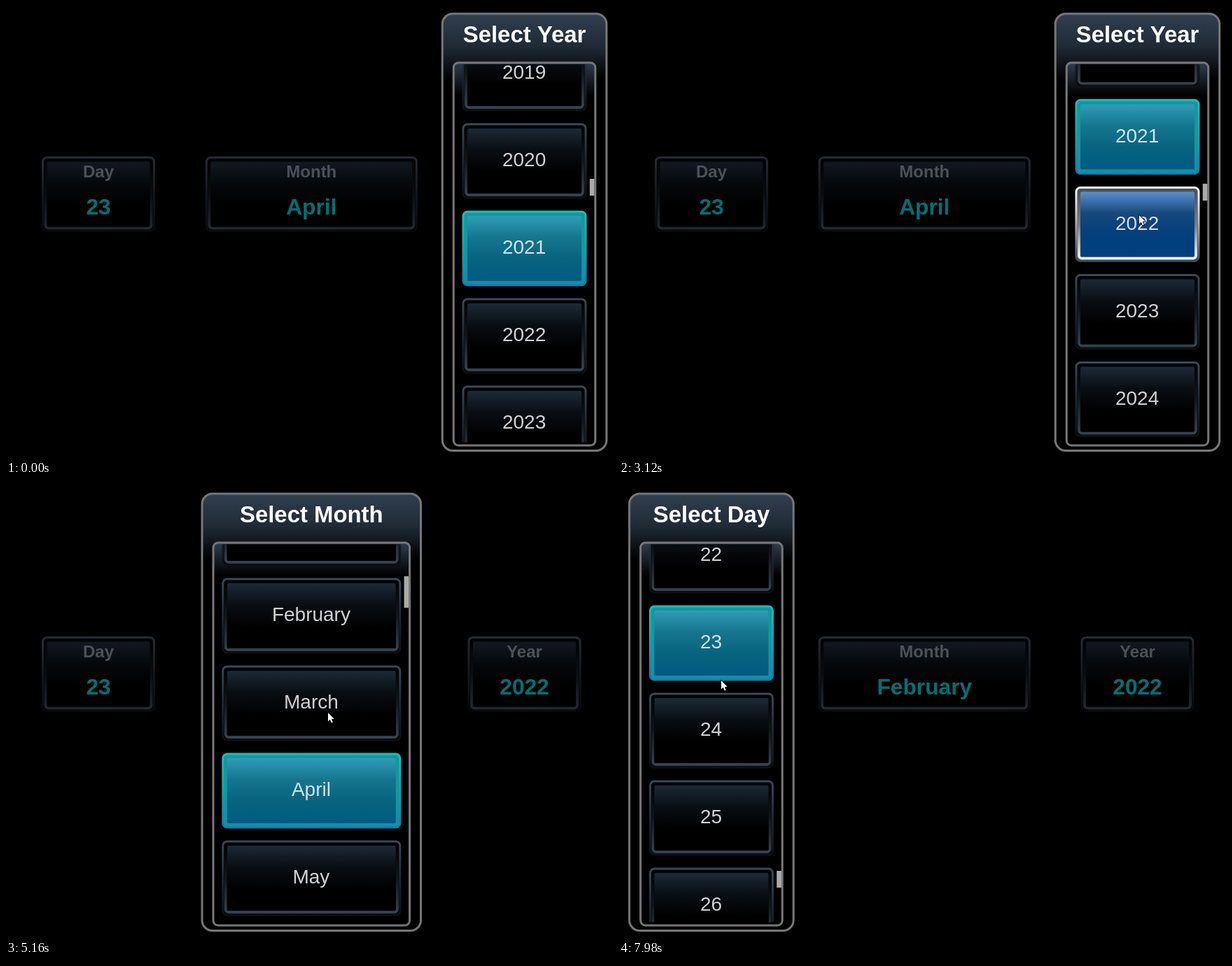
These frames come from a looping animation (867x646 px, 8 s). An HTML page with a canvas:

```html
<!DOCTYPE html>
<html lang="en">
<head>
<meta charset="utf-8">
<title>Date picker</title>
<style>
html, body { margin: 0; width: 100%; height: 100%; overflow: hidden; background: #000; }
canvas { display: block; width: 867px; height: 646px; }
</style>
</head>
<body>
<canvas id="stage" width="867" height="646"></canvas>
<script>
const ctx = document.getElementById('stage').getContext('2d');
const LOOP = 8000, STEP = 60, PITCH = 125, KEY_HEIGHT = 108;
const MONTHS = ['January', 'February', 'March', 'April', 'May', 'June', 'July'];
const ARROW = new Path2D('M0 0V12.5L2.8 9.8L4.8 14.4L6.8 13.5L4.8 9H8.8Z');

// Colours run from top to bottom.
const STYLES = {
  normal: {
    outer: ['#3b4a5b', '#1e2730', '#0c1014'],
    bezel: ['#000', '#11171d', '#3a4653'],
    face: ['#1c2a38', '#090e13', '#000', '#000']
  },
  selected: {
    outer: ['#22bbb9', '#16a3a8', '#167ba6'],
    bezel: ['#0e9a9c', '#109aa2', '#178ab0'],
    face: ['#319db7', '#15758f', '#07637f', '#005b80']
  },
  active: {
    outer: ['#fff', '#a8adb3', '#3a4756'],
    bezel: ['#484c52', '#777b80', '#fff'],
    face: ['#5a92cf', '#16487c', '#023f7c', '#003f80']
  }
};

// Moves are [start, end, target...]; presses are [start, end, row].
const PICKERS = [
  {
    name: 'Year', opens: 0, closes: 3480, x: 740.5, closedWidth: 162, keyWidth: 178,
    before: '', after: '2022', label: row => 2021 + row,
    thumb: { y: 247, height: 24, rate: 0.0445 },
    scroll: [[1320, 2040, -109.5], [2340, 2640, -159.5]],
    presses: [[3120, 3480, 1]]
  },
  {
    name: 'Month', opens: 3480, closes: 6180, x: 436.3, closedWidth: 303, keyWidth: 256,
    before: 'April', after: 'February', label: row => MONTHS[3 + row],
    thumb: { y: 175, height: 45, rate: 0.517 },
    scroll: [[4560, 5160, 89]],
    presses: [[4500, 4680, -1], [6000, 6180, -2]]
  },
  {
    name: 'Day', opens: 6180, closes: LOOP, x: 132, closedWidth: 162, keyWidth: 178,
    before: '23', after: '', label: row => 23 + row,
    thumb: { y: 529, height: 24, rate: 0.172 },
    scroll: [[7020, 7980, -122]],
    presses: []
  }
];

const CURSOR_START = [829, 106];
const CURSOR_MOVES = [
  [480, 1200, 743, 263], [1320, 2040, 728, 154], [2340, 2640, 743, 299],
  [3660, 4440, 447, 262], [4560, 5160, 460, 324], [5460, 5640, 456, 198],
  [6180, 6960, 142, 378], [7020, 7980, 146, 278]
];

function ease(k) {
  k = Math.min(1, Math.max(0, k));
  return k * k * (3 - 2 * k);
}

function follow(start, moves, t) {
  return moves.reduce((pos, [from, to, ...target]) => {
    const k = ease((t - from) / (to - from));
    return pos.map((v, i) => v + (target[i] - v) * k);
  }, start);
}

function fade(top, bottom, colors) {
  const g = ctx.createLinearGradient(0, top, 0, bottom);
  colors.forEach((c, i) => g.addColorStop(i / (colors.length - 1), c));
  return g;
}

function roundBox(x, y, w, h, r, fill, stroke, width) {
  ctx.beginPath();
  ctx.roundRect(x, y, w, h, r);
  if (fill) { ctx.fillStyle = fill; ctx.fill(); }
  if (stroke) { ctx.strokeStyle = stroke; ctx.lineWidth = width; ctx.stroke(); }
}

function text(str, x, baseline, size, color, weight = '') {
  ctx.font = `${weight} ${size}px "Liberation Sans", Arial, sans-serif`;
  ctx.textAlign = 'center';
  ctx.fillStyle = color;
  ctx.fillText(str, x, baseline);
}

function drawKey(cx, top, width, { outer, bezel, face }) {
  const left = cx - width / 2, bottom = top + KEY_HEIGHT;
  const ring = (inset, r, fill, colors, line) => roundBox(
    left + inset, top + inset, width - 2 * inset, KEY_HEIGHT - 2 * inset, r,
    fill, colors && fade(top, bottom, colors), line);
  ring(1.5, 6, bezel[0], outer, 3);
  ring(5.5, 4, null, bezel, 4);
  ring(7.5, 2, fade(top + 7, bottom - 7, face));
}

function drawClosed(p, value) {
  ctx.globalAlpha = 0.6;
  drawKey(p.x, 215, p.closedWidth, STYLES.normal);
  ctx.globalAlpha = 1;
  text(p.name, p.x, 245, 24, '#4b5159', 'bold');
  text(value, p.x, 298, 31.7, '#007072', 'bold');
}

function drawOpen(p, t) {
  const width = p.keyWidth + 56.5, left = p.x - width / 2;
  const [scroll] = follow([0], p.scroll, t);
  const press = p.presses.find(([from, to]) => t >= from && t < to);

  roundBox(left, 11, width, 624.5, 15, fade(11, 105, ['#303f50', '#1f2a35', '#000']), '#777', 3);
  roundBox(left + 16, 81, width - 32, 547, 7, fade(83, 128, ['#2c3b4c', '#000']), '#777', 3);
  text('Select ' + p.name, p.x, 52, 32.9, '#fff', 'bold');

  ctx.save();
  ctx.beginPath();
  ctx.rect(left + 17, 83.5, width - 34, 540);
  ctx.clip();
  for (let row = -3; row <= 3; row++) {
    const top = 292.5 + row * PITCH + scroll;
    const style = press && press[2] === row ? 'active' : row === 0 ? 'selected' : 'normal';
    drawKey(p.x, top, p.keyWidth, STYLES[style]);
    text(p.label(row), p.x - 0.4, top + 61.5, 28, 'rgba(255,255,255,0.82)');
  }
  ctx.fillStyle = '#aaa';
  ctx.fillRect(left + width - 24, p.thumb.y - scroll * p.thumb.rate, 6.7, p.thumb.height);
  ctx.restore();
}

function drawCursor(x, y) {
  ctx.save();
  ctx.translate(x, y);
  ctx.lineJoin = 'round';
  ctx.strokeStyle = '#000';
  ctx.lineWidth = 1.6;
  ctx.stroke(ARROW);
  ctx.fillStyle = '#fff';
  ctx.fill(ARROW);
  ctx.restore();
}

function draw(t) {
  ctx.fillStyle = '#000';
  ctx.fillRect(0, 0, 867, 646);
  for (const p of PICKERS) {
    if (t < p.opens) drawClosed(p, p.before);
    else if (t < p.closes) drawOpen(p, t);
    else drawClosed(p, p.after);
  }
  if (t >= 480) drawCursor(...follow(CURSOR_START, CURSOR_MOVES, t));
}

function tick() {
  const t = performance.now() % LOOP;
  draw(Math.floor(t / STEP) * STEP);
  requestAnimationFrame(tick);
}
tick();
</script>
</body>
</html>
```
